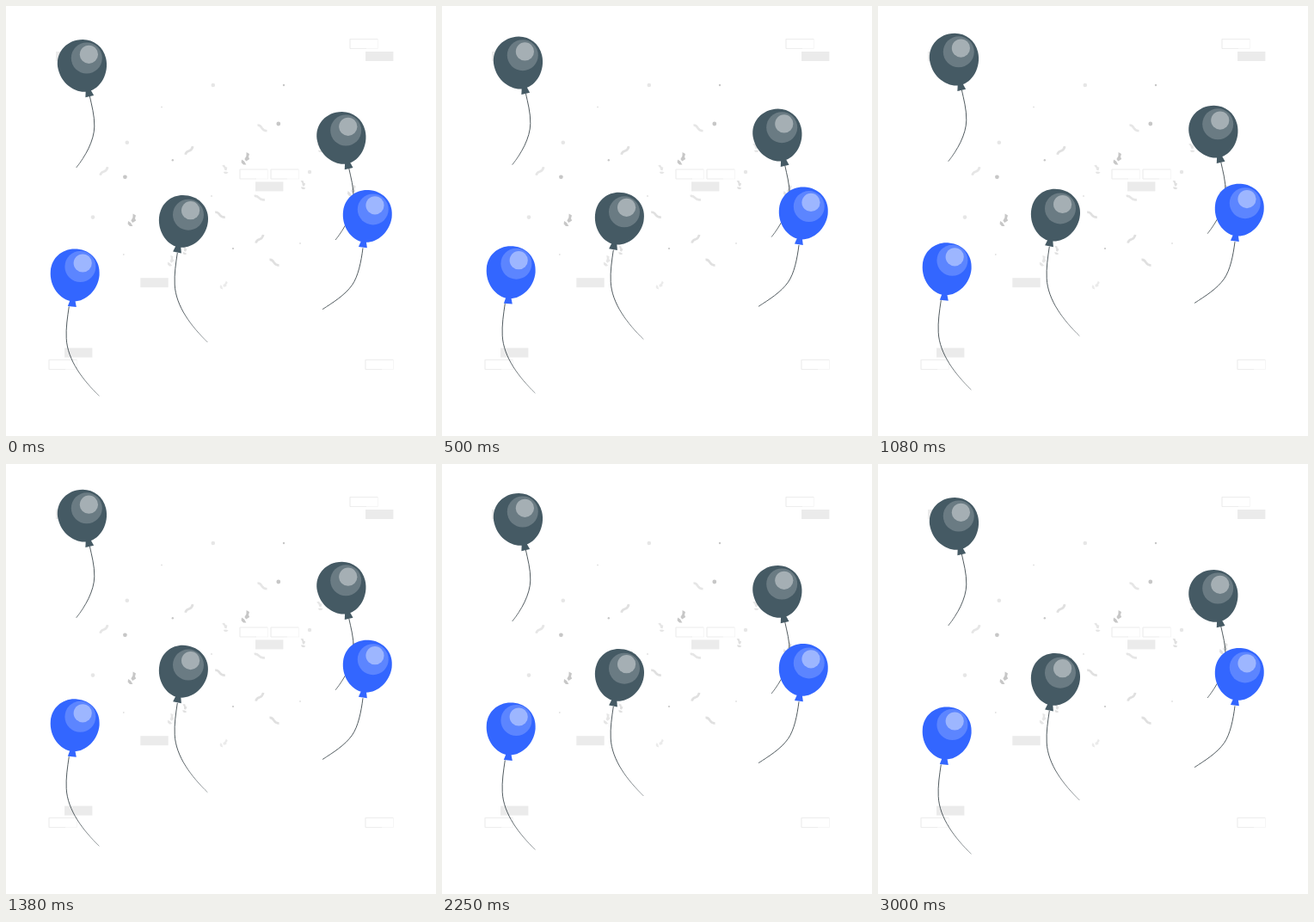
An HTML page with a canvas that plays this animation: 500 px wide and 500 px high, repeating every 3.04 s.

```html
<!DOCTYPE html>
<html lang="en">
<head>
<meta charset="utf-8">
<title>Balloons</title>
<style>
html, body { margin: 0; width: 100%; height: 100%; overflow: hidden; background: #fff; }
canvas { display: block; width: 500px; height: 500px; }
</style>
</head>
<body>
<canvas id="stage"></canvas>
<script>
const canvas = document.getElementById('stage');
const ctx = canvas.getContext('2d');
const dpr = window.devicePixelRatio || 1;
canvas.width = canvas.height = 500 * dpr;

const LOOP = 3040, STEP = 1000 / 24, RISE = 10;
const GREY = '#455a64', BLUE = '#3366ff';
const PALE = '#ebebeb', LIGHT = '#e6e6e6', SOFT = '#e0e0e0', MID = '#c7c7c7';

// Balloon parts, relative to the balloon's centre; body and knot are tilted.
const body = new Path2D('M0 -30.5C16.5 -30.5 28.5 -18.5 28.5 -2.5C28.5 15.5 14.5 30.5 0 30.5C-14.5 30.5 -28.5 15.5 -28.5 -2.5C-28.5 -18.5 -16.5 -30.5 0 -30.5Z');
const knot = new Path2D('M-2.6 28L2.6 28L5 36.6L-5 36.6Z');
const curved = new Path2D('M8.4 35.5C10.5 45.5 14 57.5 13.8 70.5C13.5 87.5 3 105.5 -7.3 118.5');
const trailing = new Path2D('M-6.7 36.5C-8.5 48.5 -10.5 61.5 -9.8 73.5C-8.6 99 10 122.5 28.4 140.5');
const sweeping = new Path2D('M-5 37C-7 53 -10.5 70 -17.5 80C-26 92 -40 100.5 -52 108.3');

// x, y, tilt, string, colour, offsets of the large and small shine
const balloons = [
  [89, 69.5, -13, curved, GREY, [4.8, -9, 7.4, -13.2]],
  [390.4, 153.5, -13, curved, GREY, [4.8, -9, 7.4, -13.2]],
  [206, 250.5, 11, trailing, GREY, [6, -7.8, 8.6, -12.8]],
  [80, 313, 5, trailing, BLUE, [6.4, -10, 9.2, -14]],
  [420, 244.4, 8, sweeping, BLUE, [6.8, -8, 9, -12.6]]
];

const bars = [[58, 53], [418, 53], [290, 204.4], [156.3, 316.2], [68, 397.6]];
const frames = [[400, 38.5], [272, 190], [308, 190], [50, 411.5], [418, 411.5]];

// x, y, radius, colour
const dots = [
  [240.8, 92, 2.3, LIGHT], [140.8, 158.8, 2.3, LIGHT], [353, 193, 2.2, LIGHT],
  [101, 245.6, 2.3, LIGHT], [316.8, 137, 2.4, MID], [138.4, 198.8, 2.4, MID],
  [323, 92, 1.2, MID], [193.8, 179.2, 1.2, MID], [264, 282, 1.1, MID],
  [181, 117.5, 0.9, SOFT], [239, 221, 0.9, SOFT], [136.8, 289, 0.9, SOFT], [342, 276, 0.9, SOFT]
];

// x, y, angle, colour
const waves = [
  [213, 168, -45, SOFT], [114, 192, -45, LIGHT], [295, 270.8, -45, SOFT],
  [298, 142, 35, LIGHT], [249, 242.8, 30, SOFT], [294.8, 223.2, 22, LIGHT],
  [312, 298.3, 35, SOFT]
];

// x, y, scale, angle, colour
const curls = [
  [278, 177, 1, 0, MID], [146, 248.5, 1, 0, MID], [254, 190, 0.75, -45, LIGHT],
  [344.6, 208, 0.72, -35, SOFT], [253, 324, 0.75, 20, PALE], [191, 296, 0.85, -10, LIGHT],
  [207, 284, 0.7, -30, SOFT], [364, 165, 0.75, -45, LIGHT], [401.5, 214, 0.95, 5, SOFT]
];
const wave = new Path2D('M-6.5 .3C-4.5 -1.2 -2.5 -.9 -.5 .2C1.8 1.3 4 1.1 6.4 -.5');
const curl = new Path2D('M1.6 -7L5 -5L4 -1.5L5.2 1L1.2 3.6L-.6 1L1.4 -2.5ZM-4 1.5L-1 3.5L1.4 7.4L-2 7.6L-4.4 5Z');

function at(x, y, deg, scale, draw) {
  ctx.save();
  ctx.translate(x, y);
  ctx.rotate(deg * Math.PI / 180);
  ctx.scale(scale, scale);
  draw();
  ctx.restore();
}

function disc(x, y, r, color) {
  ctx.fillStyle = color;
  ctx.beginPath();
  ctx.arc(x, y, r, 0, Math.PI * 2);
  ctx.fill();
}

function drawBackdrop() {
  ctx.fillStyle = PALE;
  for (const [x, y] of bars) ctx.fillRect(x, y, 32.4, 11);
  ctx.lineWidth = 0.8;
  for (const [x, y] of frames) {
    ctx.strokeStyle = '#f4f4f4';
    ctx.strokeRect(x, y, 32.4, 11);
    ctx.strokeStyle = PALE;
    ctx.beginPath();
    ctx.moveTo(x + 32, y);
    ctx.lineTo(x, y);
    ctx.lineTo(x, y + 11);
    ctx.lineTo(x + 19, y + 11);
    ctx.stroke();
  }
  for (const d of dots) disc(...d);
  for (const [x, y, deg, color] of waves) at(x, y, deg, 1, () => {
    ctx.strokeStyle = color;
    ctx.lineWidth = 2.7;
    ctx.stroke(wave);
  });
  for (const [x, y, scale, deg, color] of curls) at(x, y, deg, scale, () => {
    ctx.fillStyle = color;
    ctx.fill(curl);
  });
}

// Strings thin out towards the loose end.
function stringInk() {
  const ink = ctx.createLinearGradient(0, 36, 0, 141);
  ink.addColorStop(0, 'rgba(38,50,56,.95)');
  ink.addColorStop(0.6, 'rgba(38,50,56,.95)');
  ink.addColorStop(1, 'rgba(38,50,56,.5)');
  return ink;
}

function drawBalloon([x, y, tilt, string, color, [ax, ay, bx, by]], lift) {
  at(x, y - lift, 0, 1, () => {
    ctx.strokeStyle = stringInk();
    ctx.lineWidth = 0.85;
    ctx.stroke(string);
    at(0, 0, tilt, 1, () => {
      ctx.fillStyle = color;
      ctx.fill(knot);
      ctx.fill(body);
    });
    disc(ax, ay, 18, 'rgba(255,255,255,.2)');
    disc(bx, by, 10.6, 'rgba(255,255,255,.4)');
  });
}

function render(now) {
  const ms = Math.floor((now % LOOP) / 10) * 10;
  const t = Math.floor((ms + 4.9) / STEP) * STEP;
  const lift = RISE * Math.max(0, 1 - Math.abs(t - 1500) / 1500);
  ctx.setTransform(dpr, 0, 0, dpr, 0, 0);
  ctx.fillStyle = '#fff';
  ctx.fillRect(0, 0, 500, 500);
  drawBackdrop();
  for (const b of balloons) drawBalloon(b, lift);
}

const start = performance.now();
function tick() {
  render(performance.now() - start);
  requestAnimationFrame(tick);
}
tick();
</script>
</body>
</html>
```
